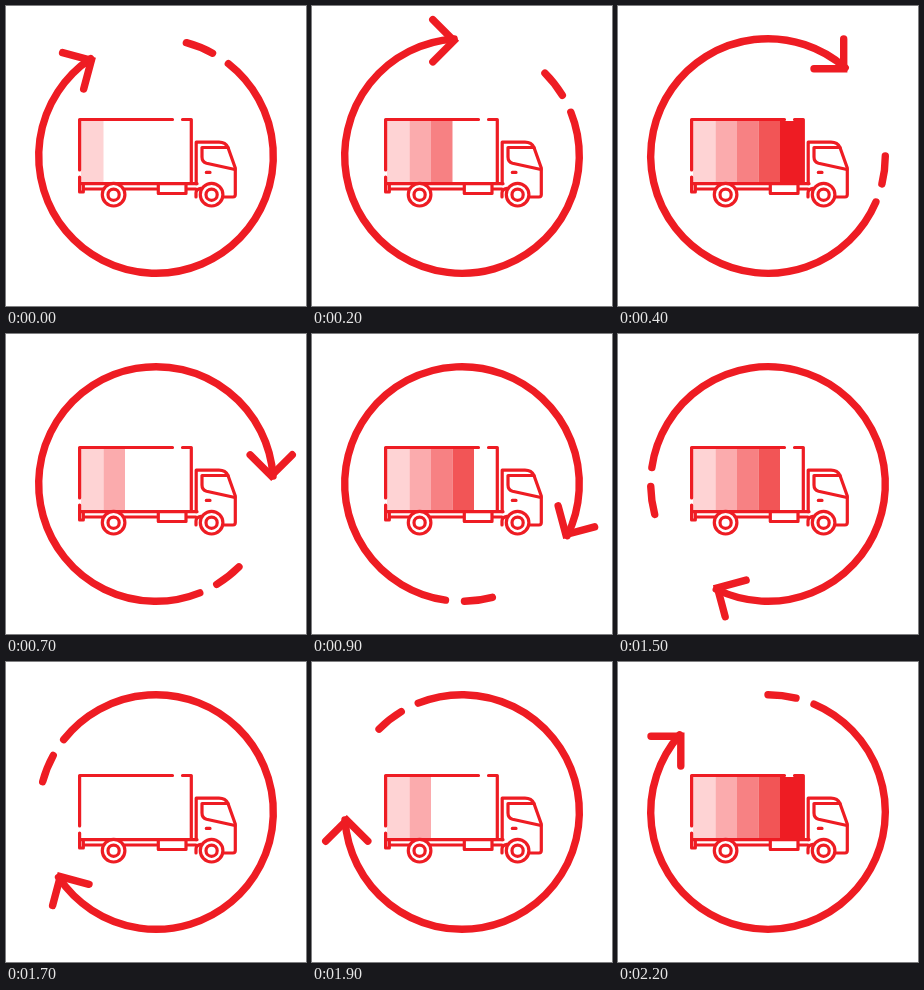
These frames come from a looping animation (300 by 300 pixels, 2300 ms). An HTML page:

```html
<!DOCTYPE html>
<html lang="en">
<head>
<meta charset="utf-8">
<title>Delivery truck loading</title>
<style>
html, body { margin: 0; width: 100%; height: 100%; overflow: hidden; background: #fff; }
svg { display: block; width: 100%; height: 100%; }
</style>
</head>
<body>
<svg viewBox="0 0 300 300" fill="none" stroke="#ee1c23" stroke-linecap="round">
  <g id="cargo" stroke="none">
    <rect x="75" y="115" width="22.5" height="62" fill="#fed3d4"/>
    <rect x="97.5" y="115" width="21.5" height="62" fill="#fbabad"/>
    <rect x="119" y="115" width="21.5" height="62" fill="#f78183"/>
    <rect x="140.5" y="115" width="21.5" height="62" fill="#f25556"/>
    <rect x="162" y="115" width="24" height="62" fill="#ee1c23"/>
  </g>
  <g stroke-width="3.2" stroke-linejoin="round">
    <!-- box -->
    <path d="M73.6 164V113.5H166.5M176.5 113.5H185.3V177"/>
    <!-- chassis -->
    <path d="M73.6 171V186H77.3V178M73.6 177.7H191M78 183H97M118.5 183H152M152.3 178V187.5H180V178M180 183H190"/>
    <!-- cab -->
    <path d="M190.2 177.7V136.2H213Q219.5 136.2 222 141.5L229.3 162V188.5Q229.3 191 227 191H217.5"/>
    <path d="M222 141.5H196V151Q196 156 200.5 157.2L229 163.5M200.3 166.4H204M190 191V187Q190 183 195 182.3"/>
    <!-- wheels -->
    <g fill="#fff">
      <circle cx="107.6" cy="188.7" r="11.3"/><circle cx="107.6" cy="188.7" r="5.6"/>
      <circle cx="205.6" cy="188.7" r="11.3"/><circle cx="205.6" cy="188.7" r="5.6"/>
    </g>
  </g>
  <g id="ring" stroke-width="7.4">
    <path d="M150 32.7A117.3 117.3 0 0 1 178 36.1M196 42.1A117.3 117.3 0 1 1 61.7 72.8"/>
    <path d="M33 74.3H62.8V104"/>
  </g>
</svg>
<script>
const STEP = 100, STEPS = 23;
const ring = document.getElementById('ring');
const stripes = [...document.getElementById('cargo').children];
const start = performance.now();

function draw(now) {
  const k = Math.floor(Math.max(0, now - start) / STEP) % STEPS;
  // The ring skips one 15 degree notch as the arrow passes the top.
  const turn = k < 3 ? k + 1 : k + 2;
  ring.setAttribute('transform', `rotate(${turn * 15} 150 150)`);
  const level = (k + 1) % 6;
  stripes.forEach((s, i) => s.setAttribute('visibility', i < level ? 'visible' : 'hidden'));
  requestAnimationFrame(draw);
}
draw(start);
</script>
</body>
</html>
```
